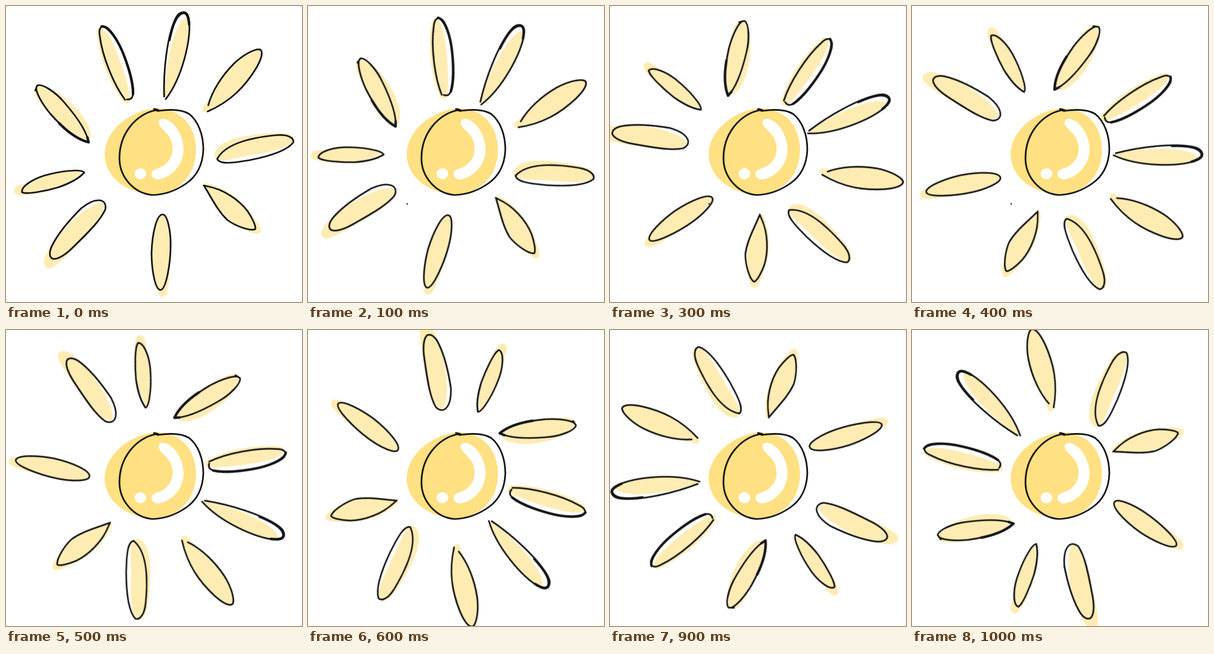
Animation of 480 by 480 pixels, one loop 1100 ms. Source, as an HTML page:

```html
<!DOCTYPE html>
<html lang="en">
<head>
<meta charset="utf-8">
<title>Sun</title>
<style>
  html, body { margin: 0; width: 100%; height: 100%; overflow: hidden; background: #fff; }
  svg { display: block; width: 100%; height: 100%; }
  #rays { transform-origin: 236px 239px; }
  .tint { fill: #ffecb3; }
  .line, .bold { fill: none; stroke: #141414; stroke-linecap: round; stroke-linejoin: round; }
  .line { stroke-width: 2.7; }
  .bold { stroke-width: 4; }
</style>
</head>
<body>
<svg viewBox="0 0 480 480">
  <g id="rays"></g>
  <path fill="#ffe082" d="M245 166C208 167 160 198 160 241C161 280 198 304 240 306C282 304 308 272 308 234C308 196 286 167 245 166Z"/>
  <path fill="#fff" d="M248 192C245 183 255 180 264 186C280 196 288 216 288 235C286 260 268 277 249 281C240 282 235 277 236 271C238 263 250 264 258 257C268 248 271 239 270 228C268 207 253 203 248 192Z"/>
  <ellipse cx="218" cy="272" rx="9.5" ry="9" fill="#fff"/>
  <path class="line" d="M240 167L247 170C267 167 284 167 297 175C312 187 320 209 320 233C319 257 311 275 292 288C276 299 258 306 238 306.500C207 304 184 277 184 247C184 208 209 176 244 168.500"/>
  <path class="bold" d="M242 168L247 169.500"/>
  <path id="speck" class="line" style="stroke-width:1.6" d="M160.500 320L161 321.500"/>
</svg>
<script>
  const STEP = 100;
  // Heading of the rays at each step, speeding up to a full turn.
  const turns = [0, 14.9, 33.2, 54.5, 77.3, 101, 126.3, 162, 202.4, 251, 303.6];
  const loop = { duration: STEP * turns.length, iterations: Infinity };

  const rays = [
    { // upper right of centre
      tint: 'M257 148C257 115 264 60 281 30C289 17 297 14 298 28C300 65 286 115 260 150Z',
      line: 'M256.500 147C255 105 261 52 274 22C281 7 295 4 297 24C300 55 286 116 259 151',
      bold: 'M265 55C271 25 279 12 288 11C294 11 296 18 297 30'
    },
    {
      tint: 'M319 165C333 150 338 130 350 114C370 89 396 70 411 71C418 75 414 88 405 103C386 130 365 155 330 171C322 174 317 172 319 165Z',
      line: 'M328 161C334 138 350 113 370 93C385 79 403 69 412 70.500C418 74 414 87 405 102C387 131 364 155 327 171'
    },
    {
      tint: 'M338 244C337 231 352 220 375 214C395 209 415 207 435 206C455 205 467 210 467 217C460 232 420 238 390 243C365 249 350 252 343 250Z',
      line: 'M342.500 248C352 230 380 215 438 209.500C456 208 467 213 466 221C456 235 425 244 395 250C366 255 346 257 342.500 248Z'
    },
    {
      tint: 'M320 287C347 290 378 309 396 335C405 347 414 358 413 366C409 373 398 368 383 360C355 347 338 322 320 287Z',
      line: 'M320.500 291L327 292.500C352 297 378 314 392 333C400 345 406 358 404 362C396 365 374 358 359 347C343 332 334 312 322 293'
    },
    {
      tint: 'M255 338C264 342 267 370 267 395C266 430 264 460 260 467C254 475 247 472 245 460C239 440 235 415 237 390C239 365 245 340 255 338Z',
      line: 'M254 338C262 338 267 365 267 387C267 415 260 461 250 460.500C240 458 236 420 236 400C237 370 244 338 254 338Z'
    },
    {
      tint: 'M158 320C163 335 140 365 115 388C95 408 80 425 70 426C61 425 60 415 64 405C75 385 95 358 115 342C130 329 150 316 158 320Z',
      line: 'M150 315C158 315 163 320 161 330C152 350 130 370 110 390C98 402 85 411 76 410C69 407 70 397 76 386C86 367 105 345 122 328C132 320 142 315 150 315Z'
    },
    {
      tint: 'M125 268C95 266 55 275 32 288C20 290 12 293 13 302C16 309 28 307 45 305C75 300 110 285 125 268Z',
      line: 'M127 270C123 264 90 267 62 275C40 282 24 294 26 302C33 306 65 300 85 294C105 287 118 280 127 270'
    },
    {
      tint: 'M46 132C68 124 100 150 118 170C130 185 140 202 137 213C130 223 105 208 85 188C65 168 42 148 46 132Z',
      line: 'M47.500 137L50.500 129C58 125 80 139 95 157C115 180 131 204 134 221C115 218 90 195 72 175C58 158 49 141 49 133',
      bold: 'M134 221C118 217 100 204 86 190M134 221L132 213'
    },
    {
      tint: 'M147 41C150 31 160 38 166 47C178 66 194 110 202 148C203 158 196 161 190 154C170 130 151 86 147 41Z',
      line: 'M193 152C175 128 156 82 152 48C150 36 154 30 164 35C182 49 206 110 206.500 138C206 149 203 152 196 151.500',
      bold: 'M155 33C166 32 182 55 192 82C201 106 206 125 206 143'
    }
  ];

  const group = document.getElementById('rays');
  const addPath = (kind, d) => {
    const path = document.createElementNS(group.namespaceURI, 'path');
    path.setAttribute('class', kind);
    path.setAttribute('d', d);
    group.append(path);
  };
  for (const kind of ['tint', 'line', 'bold'])
    for (const ray of rays) if (ray[kind]) addPath(kind, ray[kind]);

  const held = (values, frame) => [...values, values.at(-1)].map((value, i) => ({
    ...frame(value), offset: i / values.length, easing: 'step-end'
  }));

  const clips = [
    group.animate(held(turns, a => ({ transform: `rotate(${a}deg)` })), loop),
    document.getElementById('speck').animate(
      held(turns.map((_, i) => i > 0 && i < 5 ? 1 : 0), opacity => ({ opacity })), loop)
  ];
  const start = performance.now();
  const tick = () => {
    const time = (performance.now() - start) % loop.duration;
    for (const clip of clips) clip.currentTime = time;
    requestAnimationFrame(tick);
  };
  tick();
</script>
</body>
</html>
```
